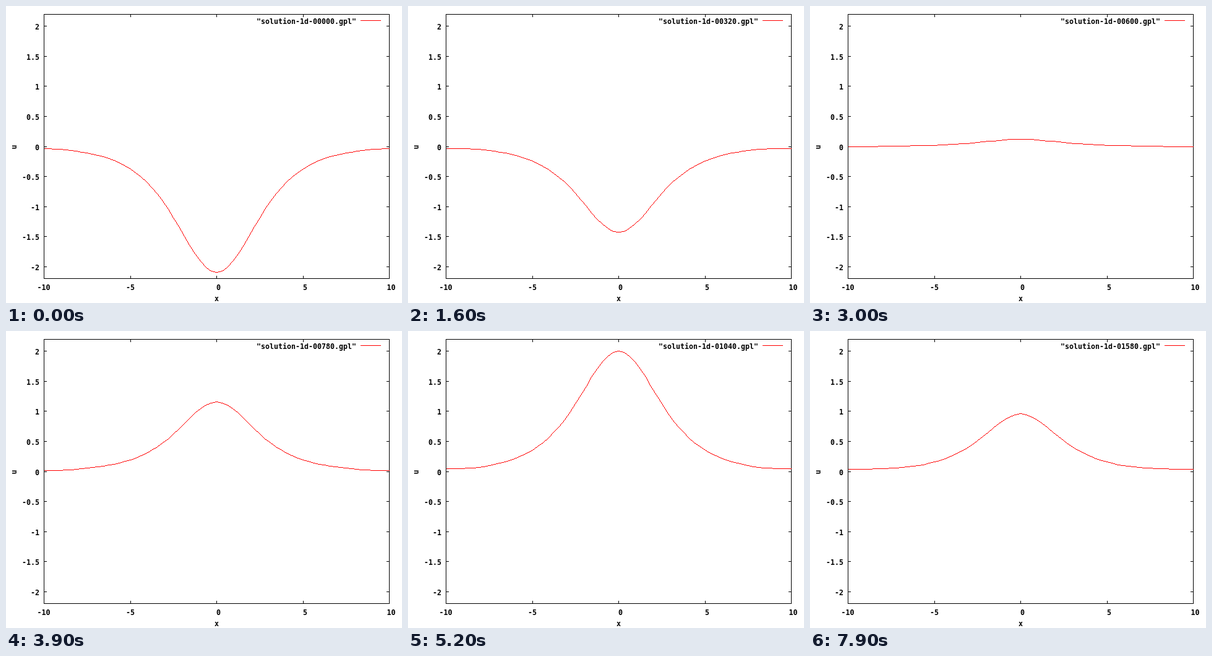
Write an HTML page with a canvas that moves like this. It is 640 px wide and 480 px high and loops after 8000 ms.

```html
<!DOCTYPE html>
<html lang="en">
<head>
<meta charset="utf-8">
<title>Breather</title>
<style>
  html, body { margin: 0; width: 640px; height: 480px; overflow: hidden; background: #fff; }
  svg, canvas { position: absolute; top: 0; left: 0; display: block; }
  canvas { left: 62px; }
  text { font: bold 11.63px "DejaVu Sans Mono", monospace; fill: #000; white-space: pre; }
  path { fill: none; stroke: #000; shape-rendering: crispEdges; }
  .mid { text-anchor: middle; }
  .end { text-anchor: end; }
</style>
</head>
<body>
<svg id="plot" width="640" height="480" viewBox="0 0 640 480">
  <path id="axes"/>
  <path d="M573 23.5H606" style="stroke:#f00"/>
  <text id="label" class="end" x="566" y="29"></text>
  <text class="mid" x="340.5" y="477">x</text>
  <text class="mid" transform="translate(17 228) rotate(-90)">u</text>
</svg>
<canvas id="curve" width="558" height="480"></canvas>
<script>
const LEFT = 61, RIGHT = 619, TOP = 13, BOTTOM = 440;
const STEP_MS = 100, STEPS = 80;
const CELLS = 128, DX = 20 / CELLS, SUBSTEPS = 5, DT = 0.0625 / SUBSTEPS;

const plot = document.getElementById('plot');
const label = document.getElementById('label');
const ctx = document.getElementById('curve').getContext('2d');

const px = x => Math.round(LEFT + (x + 10) / 20 * (RIGHT - LEFT));
const py = u => Math.round(TOP + (2.2 - u) / 4.4 * (BOTTOM - TOP));

function addText(str, x, y, cls) {
  const el = document.createElementNS('http://www.w3.org/2000/svg', 'text');
  el.setAttribute('x', x);
  el.setAttribute('y', y);
  el.setAttribute('class', cls);
  el.textContent = str;
  plot.append(el);
}

function drawAxes() {
  let d = `M${LEFT + .5} ${TOP + .5}H${RIGHT + .5}V${BOTTOM + .5}H${LEFT + .5}Z`;
  for (let v = -2; v <= 2; v += 0.5) {
    const y = py(v);
    d += `M${LEFT} ${y + .5}h5M${RIGHT + 1} ${y + .5}h-5`;
    addText(v, 54, y + 6, 'end');
  }
  for (let v = -10; v <= 10; v += 5) {
    const x = px(v);
    d += `M${x + .5} ${TOP}v5M${x + .5} ${BOTTOM + 1}v-5`;
    // non-negative labels keep an empty sign column
    addText(v, x + (v < 0 ? 0 : 3.5), 459, 'mid');
  }
  document.getElementById('axes').setAttribute('d', d);
}

// Sine-Gordon equation u_tt = u_xx - sin u with reflecting ends
function solve() {
  const accel = u => u.map((v, i) => {
    const a = u[i ? i - 1 : 1], b = u[i < CELLS ? i + 1 : CELLS - 1];
    return (a - 2 * v + b) / (DX * DX) - Math.sin(v);
  });
  let u = Array.from({ length: CELLS + 1 }, (_, i) =>
    -4 * Math.atan(1 / Math.sqrt(3) / Math.cosh((i * DX - 10) / 2)));
  const first = accel(u);
  let prev = u.map((v, i) => v + first[i] * DT * DT / 2);
  const states = [];
  for (let s = 0; s < STEPS; s++) {
    states.push(u);
    for (let k = 0; k < SUBSTEPS; k++) {
      const a = accel(u);
      const next = u.map((v, i) => 2 * v - prev[i] + a[i] * DT * DT);
      prev = u;
      u = next;
    }
  }
  return states;
}

// One-pixel line without smoothing
function line(x0, y0, x1, y1) {
  const n = Math.max(Math.abs(x1 - x0), Math.abs(y1 - y0));
  for (let i = 0; i <= n; i++) {
    const k = i / n;
    ctx.fillRect(Math.round(x0 + (x1 - x0) * k) - 62, Math.round(y0 + (y1 - y0) * k), 1, 1);
  }
}

function draw(step) {
  const u = states[step];
  label.textContent = `"solution-1d-${String(step * 20).padStart(5, '0')}.gpl"`;
  ctx.clearRect(0, 0, 558, 480);
  ctx.fillStyle = '#f00';
  for (let i = 2; i <= CELLS; i += 2) {
    line(px((i - 2) * DX - 10), py(u[i - 2]), px(i * DX - 10), py(u[i]));
  }
}

const states = solve();
let shown = -1;

function tick() {
  const step = Math.floor(performance.now() / STEP_MS) % STEPS;
  if (step !== shown) draw(shown = step);
  requestAnimationFrame(tick);
}

drawAxes();
tick();
</script>
</body>
</html>
```
